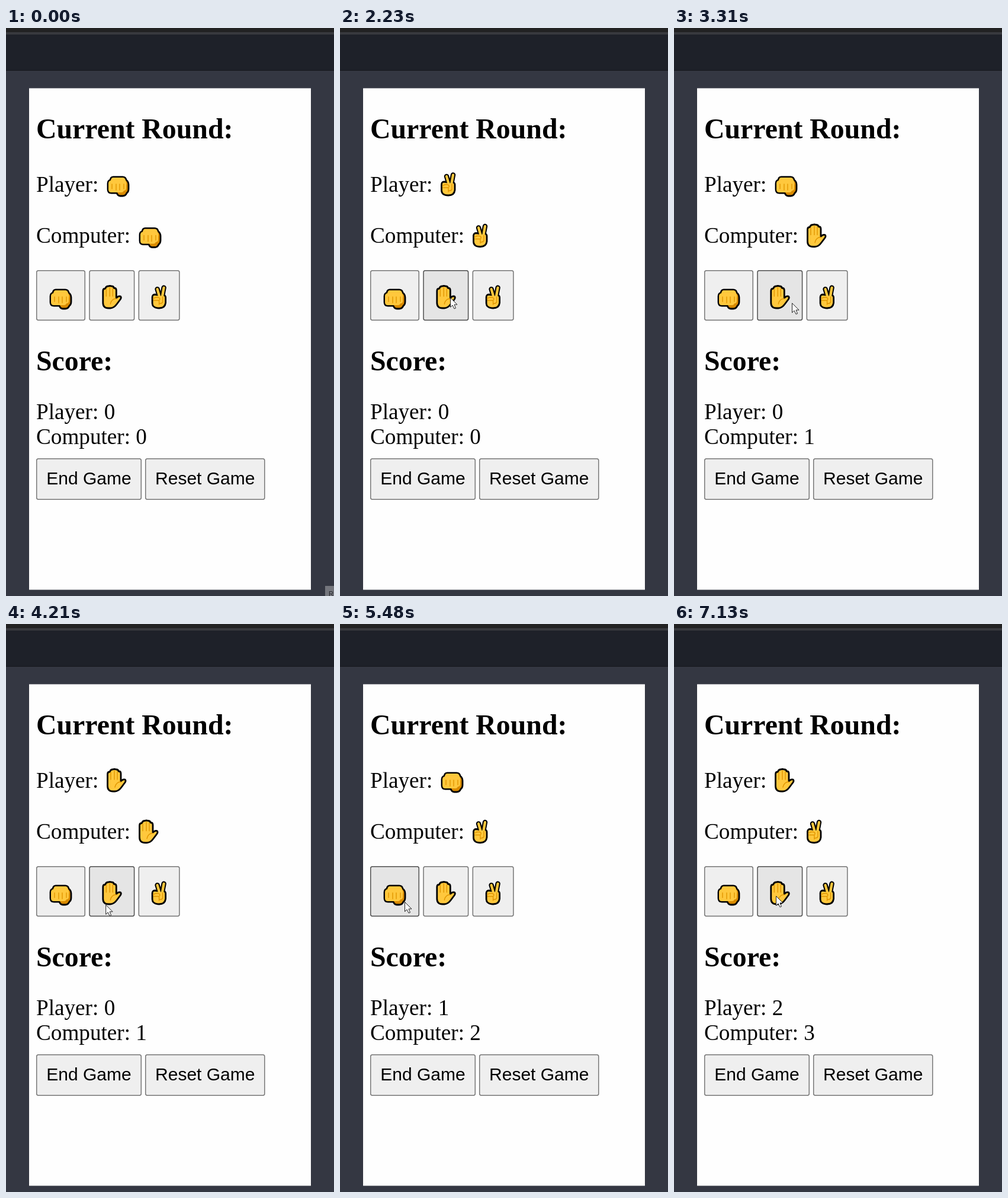
These frames come from a looping animation (554 by 957 pixels, 8 s). An HTML page:

```html
<!DOCTYPE html>
<html lang="en">
<head>
<meta charset="utf-8">
<title>Rock, Paper, Scissors</title>
<style>
  html, body { margin: 0; width: 100%; height: 100%; overflow: hidden; background: #343742; }
  svg { display: block; width: 554px; height: 957px; }
  .serif { font: 37.2px "Liberation Serif", "Times New Roman", serif; }
  .head { font: bold 47.8px "Liberation Serif", "Times New Roman", serif; }
  .label { font: 30px "Liberation Sans", Arial, sans-serif; text-anchor: middle; }
  .tip { font: 11px "Liberation Sans", Arial, sans-serif; fill: #25262b; }
  .btn { fill: #efefef; stroke: #767676; stroke-width: 1.5; }
  .btn.hover { fill: #e5e5e5; stroke: #4f4f4f; }
  .skin { fill: #ffc83d; }
  .edge { stroke: #000; stroke-width: 2.8; stroke-linejoin: round; }
  .crease { fill: none; stroke: #e19600; stroke-width: 1.4; stroke-linecap: round; }
  .finger { fill: none; stroke-linecap: round; }
</style>
</head>
<body>
<svg viewBox="0 0 554 957">
  <defs>
    <g id="rock">
      <path class="edge" fill="#d98a00" d="M12 9H28Q33 9 34 14Q38 17 38 22V29Q38 34 35 36Q33 41 28 41H24Q20 41 18 36H9Q3 36 3 30V20Q3 15 7 14Q8 9 12 9Z"/>
      <path class="skin" d="M12 10H28Q32 10 33 15Q35 18 34 23V28Q34 32 30 32Q29 35 26 35H9Q4 35 4 30V20Q4 16 8 15Q9 10 12 10Z"/>
      <path class="crease" d="M10 21V29M17 21V31M23 21V31M30 21V29"/>
    </g>
    <g id="paper">
      <path class="skin edge" d="M2.500 11Q2.500 7 6.500 7Q7.500 3 11.500 3Q14 2 17 3Q20.500 3 21 6Q25 6 25 10V23Q28 19 32 20Q34 22 32 25L26 33Q21 40 15 40H12Q2.500 40 2.500 31Z"/>
      <path class="crease" d="M8 8V20M14 5V20M19 7V20M25 24Q17 24 15 33"/>
    </g>
    <g id="scissors">
      <path class="finger" stroke="#000" stroke-width="8.400" d="M11 8L15 21M22 5.500L19 21"/>
      <path class="skin edge" d="M2.500 23Q2 17 7 17L13 18H22Q25 19 25 22V31Q24 40 14 40Q3 40 2.500 32Z"/>
      <path class="finger" stroke="#ffc83d" stroke-width="4.200" d="M11 8L15 22M22 5.500L19 22"/>
      <path class="crease" d="M4 24Q8 21 13 22Q17 24 14 27H5M14 28V34M20 21V30Q18 33 14 32"/>
    </g>
  </defs>

  <rect width="554" height="72" fill="#16181d"/>
  <rect width="554" height="11" fill="#38393e"/>
  <rect width="554" height="7" fill="#222223"/>
  <rect y="11" width="554" height="60" fill="#1e2129"/>
  <rect x="39" y="101.500" width="476" height="845" fill="#fefefe"/>

  <text class="head" x="51" y="186">Current Round:</text>
  <text class="serif" x="51" y="276">Player:</text>
  <text class="serif" x="51" y="362">Computer:</text>
  <use id="playerHand" x="169" y="242"/>
  <use id="computerHand" x="223" y="328.500"/>
  <g id="buttons"></g>
  <text class="head" x="51" y="577">Score:</text>
  <text class="serif" id="playerScore" x="51" y="659"></text>
  <text class="serif" id="computerScore" x="51" y="701"></text>

  <g id="tooltip">
    <rect x="539" y="940" width="16" height="18" fill="#74767d"/>
    <text class="tip" x="545" y="957">R</text>
  </g>
  <path id="cursor" fill="#fff" stroke="#222" stroke-linejoin="round"
    d="M.5 .5V16.500L4 13L7 19L9.500 18L7 12H12Z"/>
</svg>
<script>
const LOOP = 8000;
const LEFT = 51, GAP = 6;
const beats = { rock: "scissors", paper: "rock", scissors: "paper" };
const handWidths = { rock: 39, paper: 33, scissors: 26 };
const $ = id => document.getElementById(id);

function add(tag, attrs) {
  const el = document.createElementNS("http://www.w3.org/2000/svg", tag);
  for (const key in attrs) el.setAttribute(key, attrs[key]);
  return $("buttons").appendChild(el);
}

function addButton(x, y, width, height) {
  const el = add("rect", {
    class: "btn", x: x + .7, y: y + .7, width: width - 1.4, height: height - 1.4, rx: 3
  });
  const contains = (px, py) => px >= x && px <= x + width && py >= y && py <= y + height;
  return { el, contains };
}

const handButtons = [];
let left = LEFT;
for (const hand in handWidths) {
  const width = handWidths[hand] + 44;
  handButtons.push({ hand, ...addButton(left, 408, width, 85) });
  add("use", { href: "#" + hand, x: left + 21, y: 432 });
  left += width + GAP + .3;
}

left = LEFT;
for (const [label, width] of [["End Game", 178], ["Reset Game", 202.5]]) {
  addButton(left, 725, width, 70);
  add("text", { class: "label", x: left + width / 2, y: 769 }).textContent = label;
  left += width + GAP;
}

// Pointer moves: start time, goal, and the computer's hand if the move ends in a click
const moves = [
  { at: 30, x: 538, y: 730 },
  { at: 150, x: 560, y: 700 },
  { at: 210, x: 556, y: 502 },
  { at: 430, x: 231, y: 456, computer: "scissors" },
  { at: 1670, x: 186, y: 454 },
  { at: 2230, x: 104, y: 464, computer: "paper" },
  { at: 2520, x: 238, y: 466 },
  { at: 3220, x: 197, y: 463 },
  { at: 3400, x: 190, y: 475, computer: "paper" },
  { at: 4160, x: 112, y: 467 },
  { at: 4360, x: 265, y: 465, computer: "rock" },
  { at: 4770, x: 257, y: 497 },
  { at: 5150, x: 109, y: 468, computer: "scissors" },
  { at: 5540, x: 170, y: 495 },
  { at: 6090, x: 181, y: 499 },
  { at: 6380, x: 112, y: 470, computer: "scissors" },
  { at: 6640, x: 172, y: 454, computer: "scissors" },
  { at: 7030, x: 172, y: 458 }
];

const smooth = k => k * k * (3 - 2 * k);
const buttonAt = (x, y) => handButtons.find(b => b.contains(x, y));

// Longer moves take longer; the score follows from the hands clicked so far.
function stateAt(t) {
  const s = { x: 560, y: 930, player: "rock", computer: "rock", won: 0, lost: 0 };
  for (const { at, x, y, computer } of moves) {
    if (t < at) break;
    const duration = 60 + 1.1 * Math.hypot(x - s.x, y - s.y);
    const k = Math.min(1, (t - at) / duration);
    s.x += (x - s.x) * smooth(k);
    s.y += (y - s.y) * smooth(k);
    if (k < 1 || !computer) continue;
    s.player = buttonAt(x, y).hand;
    s.computer = computer;
    if (beats[s.player] === computer) s.won++;
    if (beats[computer] === s.player) s.lost++;
  }
  return s;
}

function draw(t) {
  const s = stateAt(t);
  $("playerHand").setAttribute("href", "#" + s.player);
  $("computerHand").setAttribute("href", "#" + s.computer);
  $("playerScore").textContent = "Player: " + s.won;
  $("computerScore").textContent = "Computer: " + s.lost;
  $("cursor").setAttribute("transform", `translate(${s.x} ${s.y})`);
  const hovered = buttonAt(s.x, s.y);
  for (const b of handButtons) b.el.classList.toggle("hover", b === hovered);
  $("tooltip").setAttribute("opacity", Math.min(1, Math.max(0, (150 - t) / 120)));
}

const start = performance.now();
function tick() {
  draw((performance.now() - start) % LOOP);
  requestAnimationFrame(tick);
}
tick();
</script>
</body>
</html>
```
